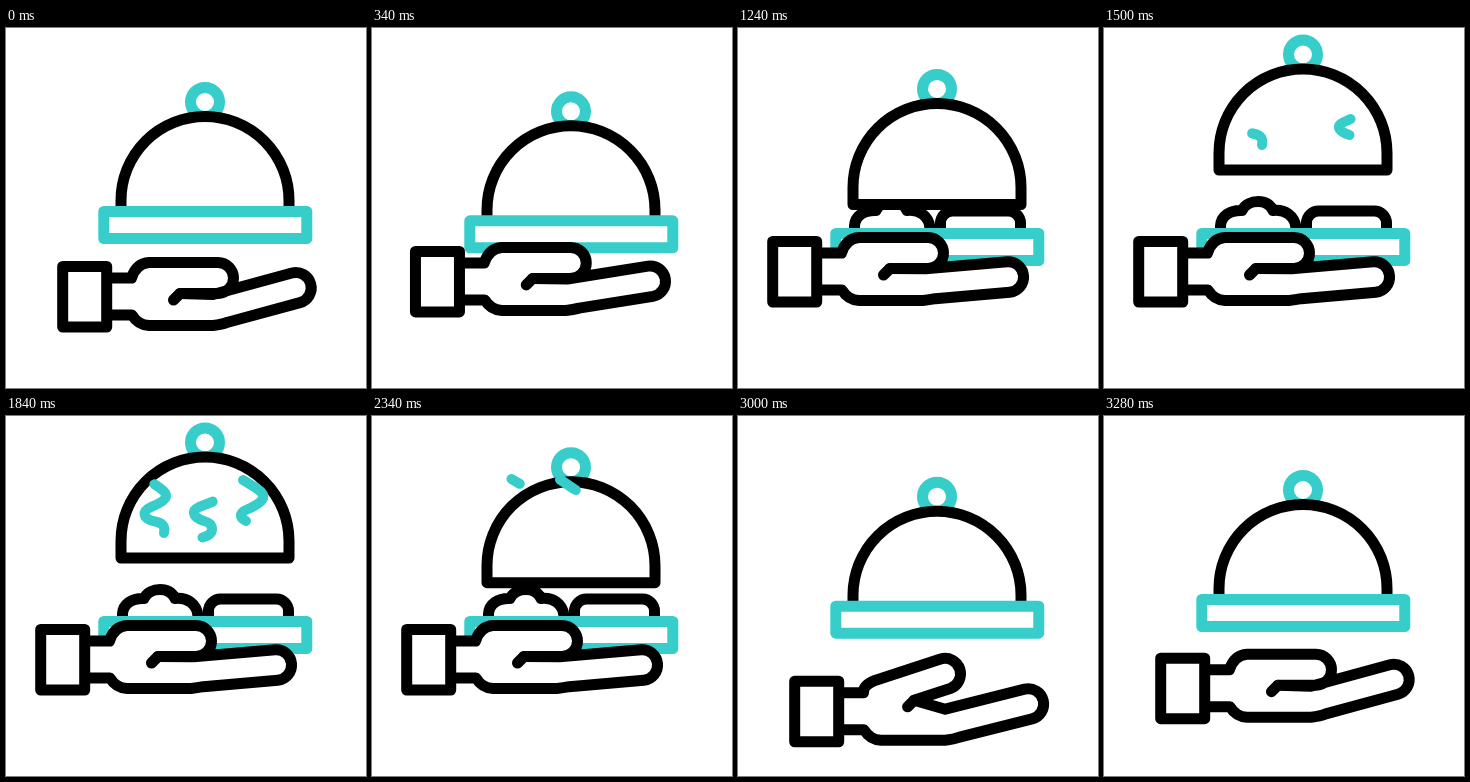
Animation of 360x360 px, one loop 3.3 s. Source, as an HTML page:

```html
<!DOCTYPE html>
<html lang="en">
<head>
<meta charset="utf-8">
<title>Serving hand</title>
<style>
  html, body { margin: 0; width: 100%; height: 100%; overflow: hidden; background: #fff; }
  svg { display: block; width: 100%; height: 100%; }
  .line { fill: #fff; stroke: #000; stroke-width: 11; stroke-linejoin: round; stroke-linecap: round; }
  .teal { stroke: #36cdcb; }
  .steam { fill: none; stroke-width: 10; }
</style>
</head>
<body>
<svg viewBox="0 0 360 360">
  <g id="food">
    <path class="line" d="M116.5 190V176C117 166 126 160 138 160.5C141 154 148 151.5 154 151.5S166 154 169 160.5C181 159 191 166 192 178V190"/>
    <path class="line" d="M202.5 190V173A12 12 0 0 1 214.5 161H270.5A12 12 0 0 1 282.5 173V190"/>
  </g>
  <g id="lid">
    <circle class="line teal" cx="199" cy="74" r="14.5"/>
    <path class="line" d="M115 189.6V172.5A84 84 0 0 1 283 172.5V189.6Z"/>
  </g>
  <g id="tray"><rect class="line teal" x="97.8" y="183.5" width="203" height="27"/></g>
  <g id="steam">
    <path class="line teal steam" pathLength="100" d="M158 117Q160 108 151 106C135 103 136 95 145 91C165 83 164 78 148 68L139.5 63"/>
    <path class="line teal steam" pathLength="100" d="M196.5 121.5Q206 119 206 113Q206 107 198 105C185 101 186 94 193 91L206 86C214 82 209 77 202 73L188 63.5"/>
    <path class="line teal steam" pathLength="100" d="M245.5 107C232 103 233 97 240 94C261 85 261 79 250 72L237 64"/>
  </g>
  <g id="hand">
    <path id="palm" class="line"/>
    <path id="crease" class="line"/>
    <rect class="line" x="56.7" y="238.5" width="44" height="60.5"/>
  </g>
</svg>
<script>
const LOOP = 3300;
const $ = id => document.getElementById(id);
const clamp = p => Math.min(1, Math.max(0, p));
const linear = (t, a, b) => clamp((t - a) / (b - a));
const ease = (t, a, b) => { const p = linear(t, a, b); return p * p * (3 - 2 * p); };
const move = (el, x, y) => el.setAttribute('transform', `translate(${x.toFixed(2)} ${y.toFixed(2)})`);

// Returns a function that turns points around (cx, cy) and formats them.
function turn(cx, cy, deg) {
  const a = deg * Math.PI / 180, c = Math.cos(a), s = Math.sin(a);
  return (x, y) => {
    const dx = x - cx, dy = y - cy;
    return `${(cx + dx * c - dy * s).toFixed(2)} ${(cy + dx * s + dy * c).toFixed(2)}`;
  };
}

function drawHand(thumbDeg, fingerDeg) {
  const th = turn(150, 255, thumbDeg);
  const fi = turn(212, 281, fingerDeg);
  const fold = th(174, 265.5);
  $('palm').setAttribute('d',
    `M101 250H125.5Q${th(130, 235.5)} ${th(143, 234.5)}L${th(212, 234.5)}` +
    `A15.5 15.5 0 0 1 ${th(212, 265.5)}L${fold}L${fi(211, 265.7)}` +
    `L${fi(292.8, 265.7)}A15.3 15.3 0 0 1 ${fi(292.8, 296.3)}L${fi(218, 296.3)}` +
    `Q${fi(212, 297)} 207 297.5H143Q132 297 126 287H101`);
  $('crease').setAttribute('d', `M${fold}l-6.5 6.5`);
}

// Head start/end, then tail start/end for each wisp.
const wisps = [
  [1400, 1900, 1860, 2400],
  [1520, 2020, 1890, 2450],
  [1300, 1800, 1800, 2300]
];

function render(t) {
  const trayY = 22 * (ease(t, 0, 760) - ease(t, 2500, 3290));
  const lift = 69.5 * (ease(t, 1065, 1415) - ease(t, 2100, 2700));
  move($('tray'), 0, trayY);
  move($('food'), 0, trayY);
  move($('lid'), 0, trayY - lift);

  const lower = ease(t, 2519, 2922);
  const grab = ease(t, 0, 600);
  const back = ease(t, 2922, 3385);
  move($('hand'), 22 * (lower - grab), -25 * grab + 54 * lower - 29 * back);

  const thumb = -21 * (lower - ease(t, 2922, 3260));
  const finger = -15.2 + 10.2 * (grab - ease(t, 2519, 3120));
  drawHand(thumb, finger);

  wisps.forEach(([a, b, c, d], i) => {
    const el = $('steam').children[i];
    const head = 100 * linear(t, a, b), tail = 100 * linear(t, c, d);
    el.style.visibility = head - tail > 0.1 ? 'visible' : 'hidden';
    el.setAttribute('stroke-dasharray', `${Math.max(0.01, head - tail)} 300`);
    el.setAttribute('stroke-dashoffset', -tail);
  });
}

const start = performance.now();
function tick() {
  render((performance.now() - start) % LOOP);
  requestAnimationFrame(tick);
}
render(0);
requestAnimationFrame(tick);
</script>
</body>
</html>
```
